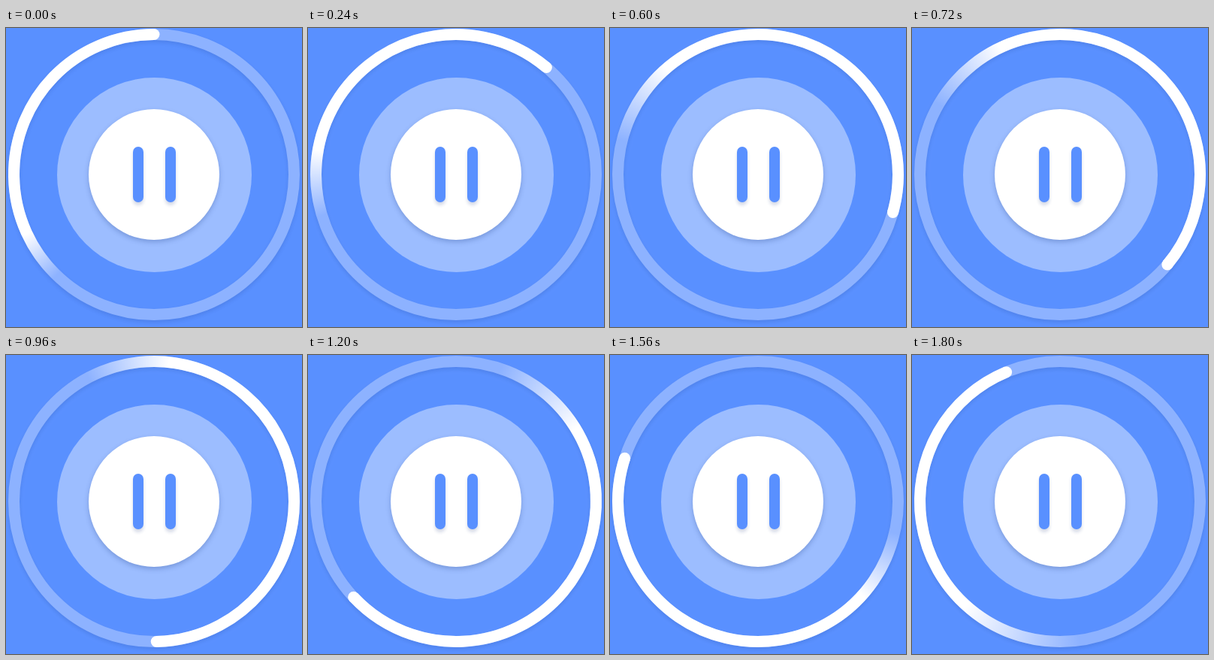
These frames come from a looping animation (394x398 px, 1920 ms). An HTML page with a canvas:

```html
<!DOCTYPE html>
<html lang="en">
<head>
<meta charset="utf-8">
<title>Progress ring</title>
<style>
  html, body { margin: 0; width: 100%; height: 100%; overflow: hidden; background: #5990ff; }
  canvas { display: block; }
</style>
</head>
<body>
<canvas id="stage" width="394" height="398"></canvas>
<script>
const ctx = document.getElementById('stage').getContext('2d');
const BLUE = '#5990ff';
const STEP = 120, STEPS = 16;
const CX = 197, CY = 195, R = 186.5, WIDTH = 15;

// Head angle for every step, in degrees clockwise from the top.
const heads = [0, 20, 40.2, 60.7, 81.5, 105.7, 130, 154.5,
               179, 203, 227, 247.4, 267.8, 288, 313, 337.5];

// Tail fade: [step, transparent end, opaque end]
const fades = [
  [0, -136, -115], [2, -107, -80], [5, -76, -41], [8, -28, 6],
  [11, 42, 85], [13, 103, 132], [15, 172, 222], [16, 224, 245]
];

const rad = deg => (deg - 90) * Math.PI / 180;

function fadeAt(step) {
  const i = fades.findIndex(f => f[0] > step);
  const a = fades[i - 1], b = fades[i];
  const k = (step - a[0]) / (b[0] - a[0]);
  return [1, 2].map(n => a[n] + (b[n] - a[n]) * k);
}

function shadow(alpha, y, blur) {
  ctx.shadowColor = `rgba(20, 50, 120, ${alpha})`;
  ctx.shadowOffsetY = y;
  ctx.shadowBlur = blur;
}

function disc(x, y, r, color) {
  ctx.fillStyle = color;
  ctx.beginPath();
  ctx.arc(x, y, r, 0, 2 * Math.PI);
  ctx.fill();
}

function ring(from, to, color) {
  ctx.strokeStyle = color;
  ctx.lineWidth = WIDTH;
  ctx.beginPath();
  ctx.arc(CX, CY, R, from, to);
  ctx.stroke();
}

function bar(x) {
  ctx.fillStyle = BLUE;
  ctx.beginPath();
  ctx.roundRect(x, 158, 14, 74, 7);
  ctx.fill();
}

function progress(step) {
  const head = rad(heads[step]);
  const [clear, solid] = fadeAt(step).map(rad);
  const origin = clear - 0.1;
  const stop = a => (a - origin) / (2 * Math.PI);
  const paint = ctx.createConicGradient(origin, CX, CY);
  paint.addColorStop(stop(clear), 'rgba(255, 255, 255, 0)');
  paint.addColorStop(stop(solid), '#fff');
  ring(clear, head, paint);
  disc(CX + R * Math.cos(head), CY + R * Math.sin(head), WIDTH / 2, '#fff');
}

function draw(step) {
  shadow(0, 0, 0);
  ctx.fillStyle = BLUE;
  ctx.fillRect(0, 0, 394, 398);

  shadow(0.14, 3, 5);
  ring(0, 2 * Math.PI, '#8db2ff');
  shadow(0, 0, 0);
  progress(step);

  disc(197.5, 195.5, 129.5, '#9cbdff');
  shadow(0.26, 3, 6);
  disc(CX, CY, 87, '#fff');
  shadow(0.18, 4, 4);
  bar(169);
  bar(212);
}

let shown = -1;
function tick() {
  const step = Math.floor(performance.now() / STEP) % STEPS;
  if (step !== shown) draw(shown = step);
  requestAnimationFrame(tick);
}
tick();
</script>
</body>
</html>
```
